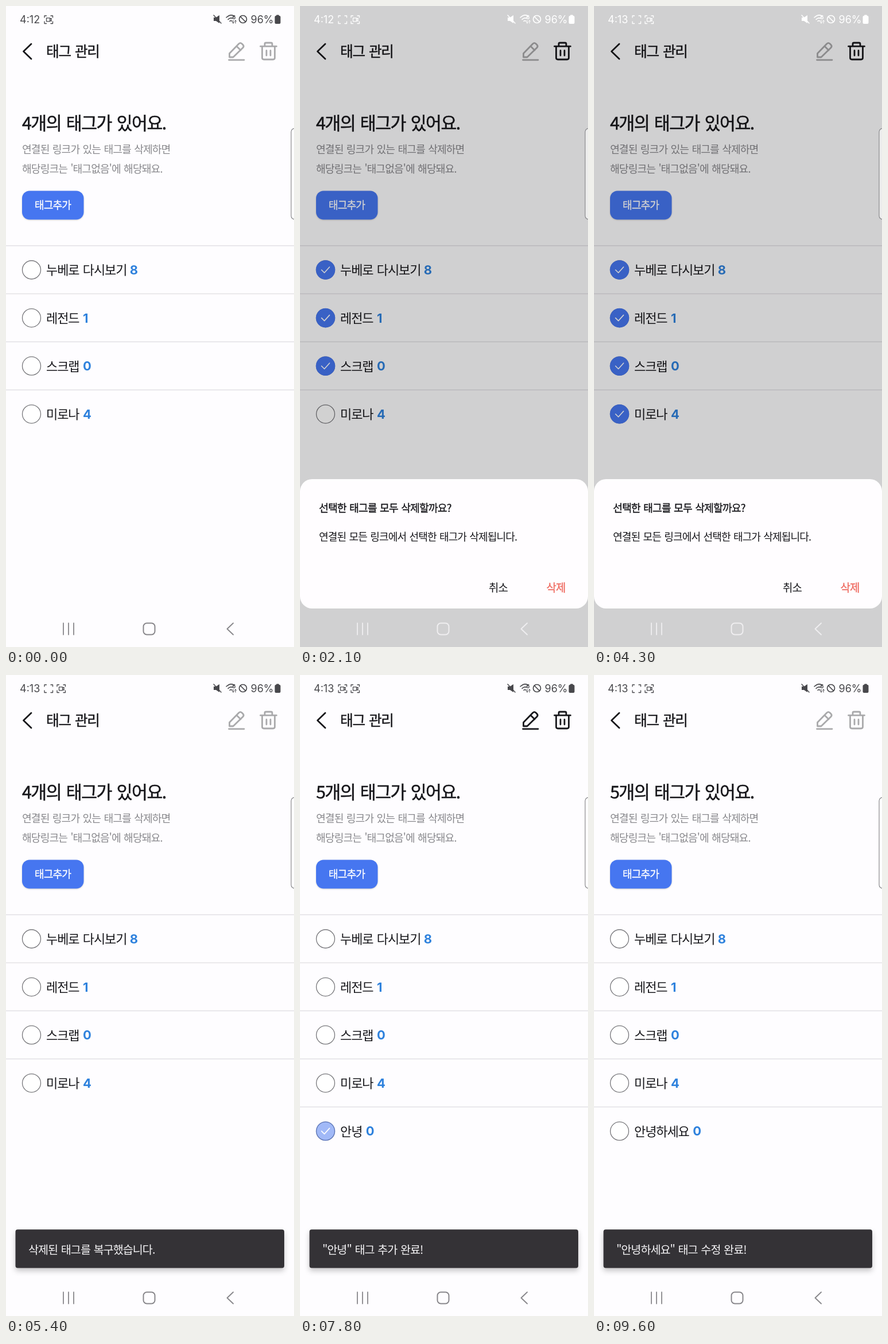
Animation of 502x1115 px, one loop 9700 ms. Source, as an HTML page:

```html
<!DOCTYPE html>
<html lang="ko">
<head>
<meta charset="utf-8">
<title>태그 관리</title>
<style>
html,body{margin:0;width:100%;height:100%;overflow:hidden;background:#fefdff}
svg{display:block;width:502px;height:1115px}
text{font-family:"Noto Sans CJK KR","Noto Sans CJK",sans-serif;letter-spacing:-.05em;word-spacing:.06em;font-weight:500}
.num{font-family:Inter,"Noto Sans CJK KR",sans-serif;letter-spacing:0}
.line{fill:none;stroke-linecap:round;stroke-linejoin:round}
.snack rect{filter:drop-shadow(0 5px 5px rgba(0,0,0,.22))}
.key{filter:drop-shadow(0 1px 1px rgba(0,0,0,.18))}
</style>
</head>
<body>
<svg id="stage" viewBox="0 0 502 1115"></svg>
<script>
const LOOP = 9700, INK = '#17171b', BLUE = '#4676f0', GREY = '#88888c', BG = '#fefdff';
const stage = document.getElementById('stage');
const ramp = (t, start, len) => Math.max(0, Math.min(1, (t - start + 100) / len));
const within = (t, a, b) => t >= a && t < b;

// Text is placed by its vertical centre; weight 600 is medium with a thin outline.
function text(x, cy, size, str, o = {}) {
  const { fill = INK, weight = 500, anchor = 'start', cls = '' } = o;
  const y = cy + size * (cls ? .36 : .38);
  const semi = weight === 600 ? `stroke="${fill}" stroke-width="${size * .018}"` : '';
  return `<text x="${x}" y="${y}" font-size="${size}" fill="${fill}" text-anchor="${anchor}" class="${cls}" ${semi} style="font-weight:${semi ? 500 : weight}">${str}</text>`;
}
const rect = (x, y, w, h, fill, r = 0, extra = '') =>
  `<rect x="${x}" y="${y}" width="${w}" height="${h}" rx="${r}" fill="${fill}" ${extra}/>`;
const line = (d, stroke = INK, w = 2, extra = '') =>
  `<path class="line" d="${d}" stroke="${stroke}" stroke-width="${w}" ${extra}/>`;
const circle = (x, y, r, fill, extra = '') => `<circle cx="${x}" cy="${y}" r="${r}" fill="${fill}" ${extra}/>`;
const group = (body, alpha = 1, dy = 0) =>
  alpha > 0 ? `<g opacity="${alpha}" transform="translate(0 ${dy})">${body}</g>` : '';
const backArrow = () => line('M44 66L30.5 79L44 92', INK, 2.8);

function castIcon(x, c, camera) {
  const corners = line(`M${x} 20v-3h3.5M${x + 11} 17h3.5v3M${x + 14.5} 27v3.5H${x + 11}M${x + 3.5} 30.5H${x}V27`, c, 1.3);
  return corners + (camera ? line(`M${x + 3.5} 20.8h6v6h-6zM${x + 9.5} 23l2.5-1.6v5l-2.5-1.6`, c, 1.3) : '');
}

function statusBar(t, dim) {
  const c = dim ? '#fff' : '#48484c';
  const blink = [[0, 600], [1000, 1400], [3200, 3600], [4700, 5100], [6400, 7300], [7500, 7900], [9000, 9400]];
  const on = blink.some(([a, b]) => within(t, a, b));
  return text(24, 23.5, 18, t < 2800 ? '4:12' : '4:13', { fill: c, weight: 400, cls: 'num' })
    + castIcon(67, c, on) + (t >= 100 ? castIcon(89, c, true) : '')
    + `<path d="M362 20h4l6-4v14l-6-4h-4z" fill="${c}"/>` + line('M362 16L375 30', c, 1.5)
    + line('M384 20q8-7 14-2M387 23.5q4-4 8-2M390 26.5q2-2 4 0', c, 1.6)
    + text(394.5, 19.5, 9, '6', { fill: c, weight: 700, cls: 'num' })
    + line('M396 25v5M394.5 28.5l1.5 1.5 1.5-1.5M400 30v-5M398.5 26.5l1.5-1.5 1.5 1.5', c, 1)
    + circle(413, 23, 6.5, 'none', `stroke="${c}" stroke-width="1.7"`) + line('M408.5 18.5L417.5 27.5', c, 1.7)
    + text(426.5, 23.5, 18, '96%', { fill: c, weight: 400, cls: 'num' })
    + rect(471, 15.5, 5, 3, c, 1) + rect(468.5, 17, 10, 14, c, 2);
}

function navBar(dim, keyboard) {
  const c = dim ? '#efeef0' : '#88878b';
  let s = line('M100 1073.5V1093.5M109 1073.5V1093.5M118 1073.5V1093.5', c, 1.8)
    + rect(239.5, 1073.5, 20, 20, 'none', 6, `stroke="${c}" stroke-width="2"`);
  if (!keyboard) return s + line('M396 1073.5L385.5 1083.5L396 1093.5', c, 1.9);
  return s + line('M380 1077.5L390.5 1087.5L401 1077.5', c, 1.9)
    + rect(23, 1068, 9, 17, 'none', 4.5, `stroke="${c}" stroke-width="2"`)
    + line('M18.5 1080q0 9 9 9t9-9M27.5 1089v6M22 1095h11', c, 1.9);
}

function tagRow(i, name, count, sel) {
  const y = 459 + 83.6 * i, size = 22;
  const gaps = name.split(' ').length - 1;
  const end = 70 + ((name.length - gaps) * .87 + gaps * .234) * size;
  return rect(0, y - 42.8, 502, 1.5, '#e3e2e5')
    + circle(44.5, y, 16, '#fff', 'stroke="#77777b" stroke-width="1.3"')
    + group(circle(44.5, y, 16.8, BLUE) + line(`M37.5 ${y}l5 5 9-10`, '#fff', 1.6), sel)
    + text(70, y, size, name)
    + text(end + 6.5, y, 22, count, { fill: '#2f82dd', weight: 700, cls: 'num' });
}

function mainPage(t) {
  let tags = [['누베로 다시보기', 8], ['레전드', 1], ['스크랩', 0], ['미로나', 4]];
  let starts = [];
  if (t < 2300) starts = [400, 700, 1100];
  else if (within(t, 3100, 4700)) starts = [3100, 3300, 3500, 3800];
  else if (within(t, 7800, 9400)) starts = [1e5, 1e5, 1e5, 1e5, 7800];
  const sel = starts.map(s => t >= s ? ramp(t, s, 200) : 0);
  const picked = sel.filter(v => v > 0).length;
  if (within(t, 2300, 2600)) tags = tags.slice(3);
  if (within(t, 4700, 5100)) tags = [];
  if (t >= 7100) tags.push([t < 9400 ? '안녕' : '안녕하세요', 0]);

  const pen = picked === 1 ? INK : '#a9a9ab', bin = picked ? INK : '#a9a9ab';
  return rect(0, 0, 502, 1115, BG) + backArrow()
    + text(70, 79, 24.6, '태그 관리', { weight: 600 })
    + line('M389.5 89v-6.5L406 65.5q2.5-2.3 5 0l2 2q2.3 2.5 0 5L396 89zM402 70l7 7M388.5 93.8H415', pen, 2.8)
    + line('M443.5 70.2H471.5M451 69v-3q0-2 2-2h9q2 0 2 2v3M446.5 70.5V90q0 3 3 3h16q3 0 3-3V70.5M454 77.5v8.5M461 77.5v8.5', bin, 2.8)
    + text(28, 203, 30.3, `${tags.length}개의 태그가 있어요.`, { weight: 600 })
    + text(28, 249, 18.2, '연결된 링크가 있는 태그를 삭제하면', { fill: GREY, weight: 400 })
    + text(28, 283, 18.2, "해당링크는 '태그없음'에 해당돼요.", { fill: GREY, weight: 400 })
    + rect(28, 321.5, 107.5, 50, BLUE, 13, 'class="key"')
    + text(81.5, 346.5, 18.2, '태그추가', { fill: '#fff', weight: 600, anchor: 'middle' })
    + tags.map(([n, c], i) => tagRow(i, n, c, sel[i] || 0)).join('');
}

function snackbar(t) {
  let msg = '', undo = false, alpha = 1;
  if (within(t, 2400, 2600) || within(t, 4800, 5100)) {
    msg = '선택한 태그를 삭제했습니다.';
    undo = true;
    alpha = ramp(t, t < 4000 ? 2400 : 4800, 200);
  } else if (within(t, 2600, 4300) || within(t, 5100, 5700)) {
    msg = '삭제된 태그를 복구했습니다.';
    alpha = 1 - ramp(t, 5600, 200);
  } else if (within(t, 7200, 8500)) {
    msg = '"안녕" 태그 추가 완료!';
    alpha = 1 - ramp(t, 8300, 300);
  } else if (t >= 9500) {
    msg = '"안녕하세요" 태그 수정 완료!';
    alpha = ramp(t, 9500, 200);
  }
  if (!msg) return '';
  return group('<g class="snack">' + rect(16.5, 964.5, 468.5, 67, '#343236', 4) + '</g>'
    + text(39, 999.5, 19.6, msg, { fill: '#f6f5f7', weight: 400 })
    + (undo ? text(463, 999.5, 18.7, '실행취소', { fill: '#8fb0ff', anchor: 'end' }) : ''), alpha);
}

function dialog(p) {
  if (p <= 0) return '';
  return rect(0, 0, 502, 1115, '#000', 0, `opacity="${.18 * p}"`)
    + group(rect(0, 823, 502, 225, '#fffdff', 21)
      + text(33, 873, 18.3, '선택한 태그를 모두 삭제할까요?', { weight: 600 })
      + text(33, 923, 18.1, '연결된 모든 링크에서 선택한 태그가 삭제됩니다.')
      + text(329, 1012, 18.9, '취소')
      + text(429.5, 1012, 18.9, '삭제', { fill: '#ef6b60', weight: 600 }), 1, (1 - p) * 292);
}

function editPage(title, sub, y, value, composing, handle) {
  const w = value.length * .87 * 19.1;
  return rect(0, 0, 502, 1115, BG) + backArrow()
    + text(480, 79, 19.4, '완료', { fill: '#3f6fdf', anchor: 'end' })
    + text(251, 207.5, 30.6, title, { weight: 600, anchor: 'middle' })
    + text(251, 254, 17.2, sub, { fill: GREY, weight: 400, anchor: 'middle' })
    + text(58.5, y, 19.1, value, { weight: 400 })
    + (composing ? rect(58.5, y + 9, w, 1.3, INK) : '')
    + rect(58.5, y + 23.5, 385, 1.6, INK)
    + (value ? circle(429.5, y, 10.5, '#c3c8d6') + line(`M425.5 ${y - 4}l8 8m0-8l-8 8`, '#fff', 2) : '')
    + (handle ? `<path d="M93.5 359L103.5 368.5A14.3 14.3 0 1 1 83.5 368.5Z" fill="${BLUE}"/>` : '');
}

function wave() {
  const skin = '#f7c458';
  return `<g transform="translate(378 670) rotate(-28)">`
    + rect(-8, -3, 16, 15, skin, 7)
    + line('M-6 0V-9M-2 0V-12M2.5 0V-12M6.5 0V-8M7 7L12 0', skin, 4.2)
    + line('M-4 1V-8M.3 1V-9M4.5 1V-8', '#d99a35', .8)
    + line('M-10-12q2-3 5-4M12-9q1 3 0 5M-12 9q1 4 5 5', '#8d8d91', 1.1) + '</g>';
}

function toolbar() {
  const outline = `stroke="${INK}" stroke-width="2"`;
  const gear = Array.from({ length: 24 }, (_, i) => {
    const a = i * Math.PI / 12, r = i % 4 < 2 ? 11.2 : 8.8;
    return `${i ? 'L' : 'M'}${386 + r * Math.cos(a)} ${669 + r * Math.sin(a)}`;
  }).join('') + 'Z';
  return [55, 165.5, 276, 386].map(x => circle(x, 669, 22, '#e7e6ea')).join('')
    + circle(55, 669, 11, 'none', outline)
    + circle(51, 666, 1.7, INK) + circle(59, 666, 1.7, INK) + line('M49.5 671q5.5 7 11 0')
    + rect(155, 664, 15, 15, '#e7e6ea', 3, outline)
    + line('M159 663v-2q0-3 3-3h11q3 0 3 3v11q0 3-3 3h-2')
    + text(162.5, 671.5, 11, 'A', { weight: 700, anchor: 'middle', cls: 'num' })
    + line('M167 664h5m-2-2l2 2-2 2', INK, 1.4)
    + rect(267, 658.5, 18, 22, 'none', 4, outline) + line('M272 659v4.5h8V659')
    + line(gear) + circle(386, 669, 3.5, 'none', outline);
}

function suggestions(value) {
  const words = value.startsWith('안녕') ? ['안녕하세요', '안녕히'] : ['안녕', '오늘'];
  return rect(19.5, 660, 23, 19, 'none', 4, `stroke="${INK}" stroke-width="2"`)
    + line('M33 665l-4.5 4.5 4.5 4.5')
    + text(124, 670.5, 23.4, words[0], { weight: 400, anchor: 'middle' })
    + text(250.5, 670.5, 23.4, words[1], { weight: 400, anchor: 'middle' }) + wave();
}

function keyboard(value, typing) {
  const key = (x, y, w, h, label = '', dark = false, size = 24) =>
    rect(x, y, w, h, dark ? '#c9c8cc' : '#fcfbfe', 7, 'class="key"')
    + text(x + w / 2, y + h / 2, size, label, { weight: 400, anchor: 'middle', cls: /^[\d!]/.test(label) ? 'num' : '' });
  const row = (chars, x, y, h) => [...chars].map((c, i) => key(x + i * 48.75, y, 41.5, h, c)).join('');
  return rect(0, 638, 502, 62, '#f4f3f6') + rect(0, 700, 502, 415, '#e2e1e5')
    + (typing ? suggestions(value) : toolbar())
    + [464.5, 472, 479.5].map(x => circle(x, 669, 2.3, INK)).join('')
    + row('1234567890', 10.5, 711, 44) + row('ㅂㅈㄷㄱㅅㅛㅕㅑㅐㅔ', 10.5, 770, 55)
    + row('ㅁㄴㅇㄹㅎㅗㅓㅏㅣ', 35, 840, 54) + row('ㅋㅌㅊㅍㅠㅜㅡ', 83.5, 909, 55)
    + key(10.5, 909, 58, 55, '', true) + line('M39.5 925.5l10.5 11h-5.5v11h-10v-11H29z')
    + key(433.5, 909, 58, 55, '', true)
    + line('M456 927h16q3 0 3 3v13q0 3-3 3h-16l-7-9.5zM459.5 932.5l8 8m0-8l-8 8')
    + key(10.5, 979, 59.5, 54, '!#1', true)
    + key(77.5, 979, 41.5, 54, '', true) + text(84, 997, 13, '한') + text(100, 1015, 13, '영', { fill: '#88888c' })
    + line('M90 1015L106 997', '#66666a', 1.2)
    + key(127, 979, 41, 54) + text(147.5, 1012, 26, ',', { anchor: 'middle', cls: 'num' })
    + key(175.5, 979, 193.5, 54) + line('M251.5 1003v6.5h41.5v-6.5')
    + key(377.5, 979, 40.5, 54) + text(398, 1010, 26, '.', { anchor: 'middle', cls: 'num' })
    + key(426, 979, 65.5, 54, '', true) + text(458.5, 1007, 17.5, '완료', { fill: '#3f6fdf', anchor: 'middle' });
}

function draw(t) {
  const ask = ramp(t, 1600, 200) - ramp(t, 2200, 200) + (t >= 4300 ? 1 : 0) - ramp(t, 4600, 200);
  const adding = ramp(t, 5600, 200) - ramp(t, 7100, 200);
  const renaming = ramp(t, 8300, 300) - ramp(t, 9400, 200);
  const keys = ramp(t, 5700, 300) - ramp(t, 7000, 200) + (t >= 8700 ? 1 : 0) - ramp(t, 9400, 200);
  const typed = (list, start) => list[Math.min(list.length - 1, Math.floor((t - start) / 100))] || '';
  const first = typed(['ㅇ', '아', '안', '안ㄴ', '안녀', '안녕'], 6300);
  const second = typed(['ㅎ', '하', '핫', '하세', '하셍', '하세요'], 8800);
  const value = t < 8000 ? first : '안녕' + second;
  const typing = t < 8000 ? !!first : !!second;

  return mainPage(t)
    + group(editPage('태그 추가', '', 339.5, value, typing, false), adding)
    + group(editPage('태그 이름 변경', '새로운 태그 이름을 입력해주세요.', 347.5, value, typing, t >= 8700 && !second), renaming)
    + snackbar(t)
    + (keys > 0 ? group(keyboard(value, typing), 1, (1 - keys) * 477) : '')
    + dialog(ask)
    + rect(497, 213, 20, 158, '#fff', 6, 'fill-opacity=".6" stroke="#8a8a8d" stroke-width="1.2"')
    + statusBar(t, ask > .4) + navBar(ask > .4, keys > .5);
}

let last = -1;
function tick() {
  const step = Math.floor(((performance.now() + 1) % LOOP) / 100);
  if (step !== last) {
    last = step;
    stage.innerHTML = draw(step * 100);
  }
  requestAnimationFrame(tick);
}
tick();
</script>
</body>
</html>
```
